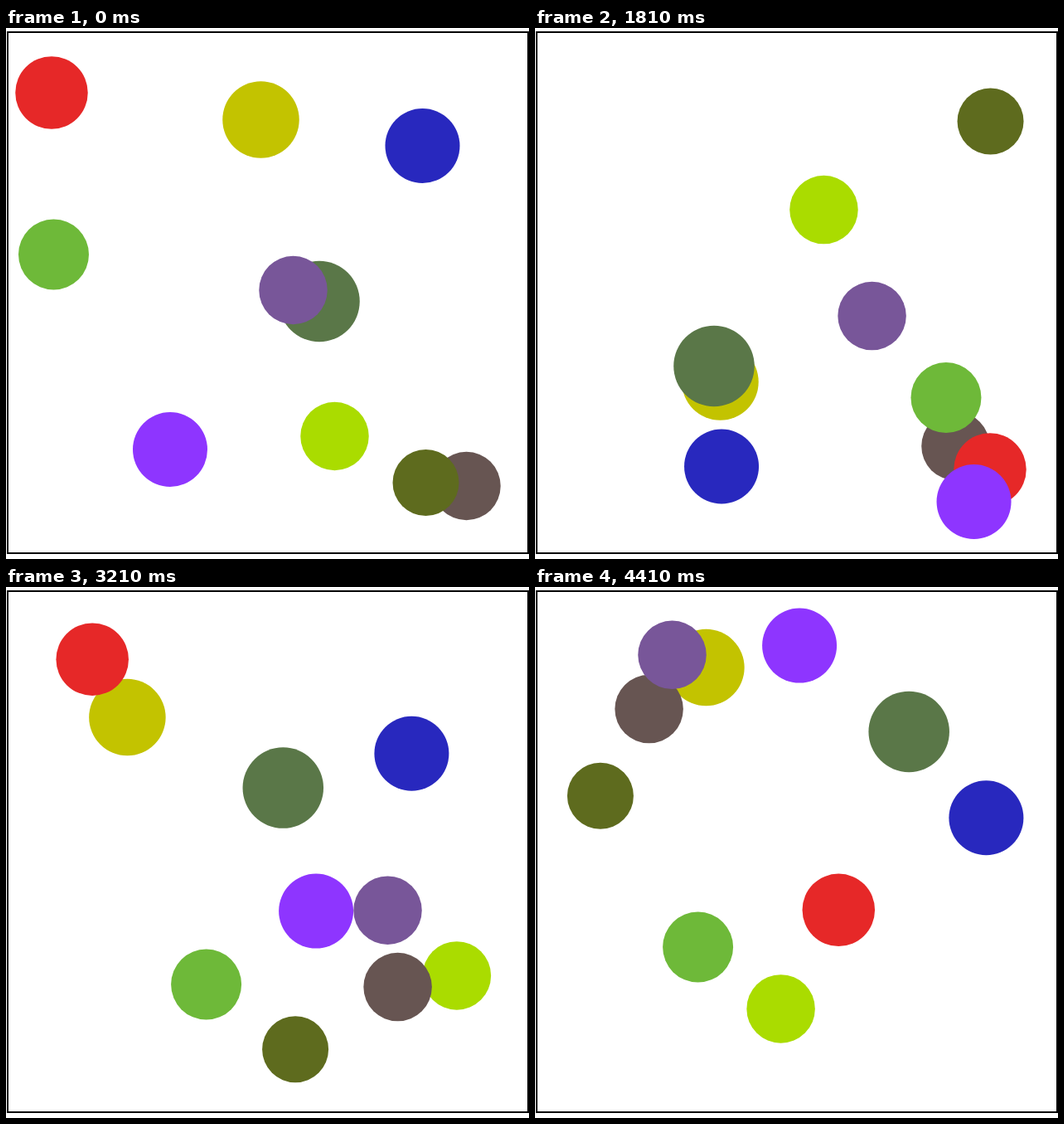
These frames come from a looping animation (631x640 px, 4470 ms). An HTML page with a canvas:

```html
<!DOCTYPE html>
<html lang="en">
<head>
<meta charset="utf-8">
<title>Bouncing balls</title>
<style>
  html, body { margin: 0; width: 100%; height: 100%; overflow: hidden; background: #fff; }
  canvas { display: block; width: 631px; height: 640px; }
</style>
</head>
<body>
<canvas id="stage" width="631" height="640"></canvas>
<script>
const ctx = document.getElementById('stage').getContext('2d');
const LOOP = 4470, STEP = 66.74, LAST = 66;
const BOX = { left: 4, top: 7, size: 625 };

// colour, radius, start x, start y, speed x, speed y; back to front
const balls = [
  ['#aadc00', 41.25, 396.5, 492, -2, -3],
  ['#c3c300', 46.25, 307.5, 110.5, 3, 3],
  ['#675552', 41.25, 555.5, 552, -2, -2],
  ['#6eb939', 42.5, 57.5, 273, 3, -3],
  ['#2828be', 45, 502.5, 142, -3, -1],
  ['#e62828', 43.75, 55, 78, 1, 1],
  ['#5a7748', 48.75, 378, 329.5, 1, 2],
  ['#8e35ff', 45, 198, 508, -3, 2],
  ['#5e6b1e', 40, 506.5, 548, 2, -1],
  ['#785699', 41.25, 346.5, 316, -5, -1]
];

// distance covered at unit speed, as [step, pixels]
const travel = [[0, 0], [10, 211.2], [21, 440.1], [34, 714], [48, 1011.3], [59, 1241.3], [66, 1386.3]];

function distance(step) {
  const i = Math.max(1, travel.findIndex(([s]) => s >= step));
  const [s0, d0] = travel[i - 1], [s1, d1] = travel[i];
  return d0 + (d1 - d0) * (step - s0) / (s1 - s0);
}

// reflect a straight path between two walls
function bounce(pos, wall, r) {
  const min = wall + r, span = BOX.size - 2 * r, period = 2 * span;
  const p = (((pos - min) % period) + period) % period;
  return min + (p > span ? period - p : p);
}

function drawPointer() {
  ctx.beginPath();
  ctx.moveTo(613.5, 641);
  ctx.lineTo(613.5, 633.5);
  ctx.lineTo(620.5, 640.5);
  ctx.lineWidth = 1;
  ctx.strokeStyle = '#222';
  ctx.stroke();
}

function draw(time) {
  const step = Math.min(LAST, Math.floor((time % LOOP + 2) / STEP));
  const d = distance(step);
  ctx.fillStyle = '#fff';
  ctx.fillRect(0, 0, 631, 640);
  ctx.lineWidth = 2;
  ctx.strokeStyle = '#000';
  ctx.strokeRect(2, 5, 628, 628);
  for (const [color, r, x, y, vx, vy] of balls) {
    ctx.beginPath();
    ctx.arc(bounce(x + vx * d, BOX.left, r), bounce(y + vy * d, BOX.top, r), r, 0, 2 * Math.PI);
    ctx.fillStyle = color;
    ctx.fill();
  }
  if (step >= 20 && step <= 24) drawPointer();
}

const start = performance.now();
function tick() {
  draw(performance.now() - start);
  requestAnimationFrame(tick);
}
tick();
</script>
</body>
</html>
```
